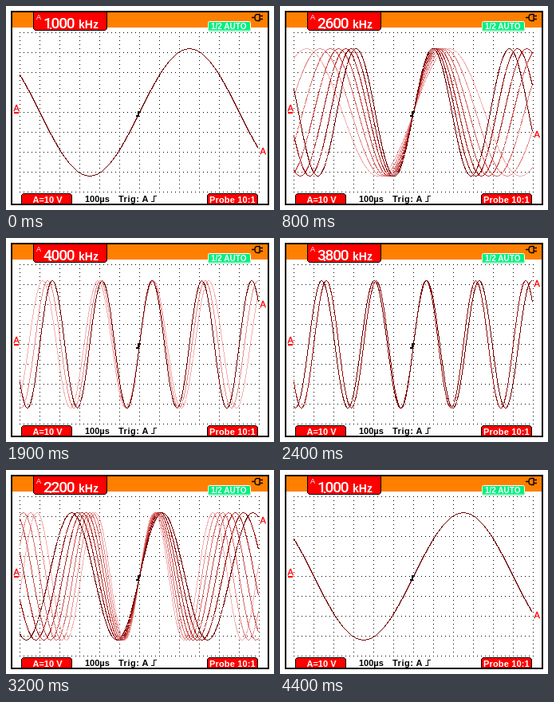
An HTML page for the animation above (4600 ms loop, 336x256 px).

```html
<!DOCTYPE html>
<html lang="en">
<head>
<meta charset="utf-8">
<title>Frequency sweep</title>
<style>
  html, body { margin: 0; width: 100%; height: 100%; overflow: hidden; background: #fff; }
  svg { display: block; width: 336px; height: 256px; }
  text { font: bold 11px "Liberation Sans", Arial, sans-serif; }
  .crisp { shape-rendering: crispEdges; }
  .white { fill: #fff; }
  .red { fill: #f00; }
  .tag { fill: #f00; stroke: #000; }
  .mark { font-weight: 400; stroke: #f00; stroke-width: .3; }
  #digits { font: 500 19px Roboto, "Liberation Sans", sans-serif; letter-spacing: -1.2px; }
</style>
</head>
<body>
<svg viewBox="0 0 336 256">
  <rect width="336" height="256" fill="#fff"/>
  <rect class="crisp" x="8" y="8" width="320" height="19" fill="#ff7f00"/>
  <rect class="crisp" x="7" y="7" width="322" height="242" fill="none" stroke="#000" stroke-width="2"/>

  <g id="grid" class="crisp" stroke="#000" stroke-dasharray="1 4"></g>
  <g id="traces" class="crisp" fill="none"></g>
  <path class="crisp" d="M163 138h3v-5h3" fill="none" stroke="#000" stroke-width="2"/>

  <path class="tag" d="M34.5 7.5h92v21l-2 2h-88l-2-2z"/>
  <text class="white" x="38" y="17" style="font-size:9px;font-weight:400">A</text>
  <text class="white" id="digits" x="47" y="28"></text>
  <rect class="white crisp" x="55" y="27" width="2" height="2"/>
  <text class="white" x="91" y="28" style="font-size:14px">kHz</text>

  <rect x="253.5" y="19.5" width="53" height="11" rx="2" fill="#00f07c" stroke="#fff"/>
  <path d="M254 28.5v1.5q0 1 1 1h50q1 0 1-1v-1.5" fill="none" stroke="#00f07c"/>
  <text class="white" x="257" y="29" style="font-size:10px">1/2 AUTO</text>
  <path d="M308 14.5h4M318 10.500h-3q-3 0-3 4t3 4h3zM318 12.500h4M318 16.500h4" fill="none" stroke="#000" stroke-width="1.3"/>

  <text class="red mark" x="9.500" y="132">A</text>
  <rect class="red crisp" x="10" y="133" width="6" height="2"/>
  <text class="red mark" id="endMark" x="318.500">A</text>

  <path class="tag" d="M19.500 248.500v-11l2-2h59l2 2v11z"/>
  <text class="white" x="33.500" y="247">A=10 V</text>
  <text x="99" y="246">100µs</text>
  <text x="141" y="246" style="letter-spacing:.5px">Trig: A</text>
  <path class="crisp" d="M182 245.500h3v-7h4" fill="none" stroke="#000"/>
  <path class="tag" d="M252.500 248.500v-11l2-2h59l2 2v11z"/>
  <text class="white" x="255" y="247" style="letter-spacing:.15px">Probe 10:1</text>
</svg>
<script>
const LOOP = 4600, STEP = 100, STEPS = LOOP / STEP;
const LEFT = 17, RIGHT = 316, CENTER_X = 167, CENTER_Y = 133.5, AMPLITUDE = 79.8, PERIOD = 250;
const SHADES = ['#700000', '#960808', '#b02828', '#c84a4a', '#d86c6c', '#e88e8e', '#f4b0b0'];
const $ = id => document.getElementById(id);

function add(parent, tag, attrs) {
  const node = document.createElementNS('http://www.w3.org/2000/svg', tag);
  for (const key in attrs) node.setAttribute(key, attrs[key]);
  return parent.appendChild(node);
}

for (let x = LEFT; x <= 317; x += 25) add($('grid'), 'path', { d: `M${x + .5} 33V234` });
for (let y = 33; y <= 233; y += 25) add($('grid'), 'path', { d: `M${LEFT} ${y + .5}H318` });

// Oldest trace first, so the live one lies on top.
const traces = SHADES.map((_, i) => {
  const age = SHADES.length - 1 - i;
  return { age, node: add($('traces'), 'polyline', { stroke: SHADES[age] }) };
});

// Sweep up to 4 kHz, hold, sweep down to 1 kHz, hold.
function frequency(step) {
  const s = (step + STEPS) % STEPS;
  return s < 24 ? Math.min(4000, 1000 + 200 * s) : Math.max(1000, 3800 - 200 * (s - 24));
}

function wave(x, hertz) {
  return CENTER_Y - AMPLITUDE * Math.sin(2 * Math.PI * (x - CENTER_X) * hertz / 1000 / PERIOD);
}

function points(hertz) {
  const list = [];
  for (let x = LEFT; x <= RIGHT; x++) list.push(`${x + .5},${Math.floor(wave(x, hertz)) + .5}`);
  return list.join(' ');
}

let shown = -1;
function draw(time) {
  const step = Math.floor(time % LOOP / STEP);
  if (step !== shown) {
    shown = step;
    const hertz = frequency(step);
    for (const { age, node } of traces) node.setAttribute('points', points(frequency(step - age)));
    $('digits').textContent = hertz;
    $('endMark').setAttribute('y', Math.round(Math.min(211, wave(RIGHT, hertz) + 3) + 4));
  }
}

const start = performance.now();
function tick() {
  draw(performance.now() - start);
  requestAnimationFrame(tick);
}
tick();
</script>
</body>
</html>
```
